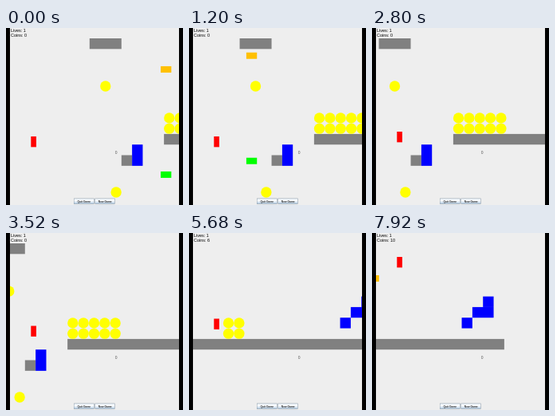
Animation of 222 by 222 pixels, one loop 8 s. Source, as an HTML page with a canvas:

```html
<!DOCTYPE html>
<html>
<head>
<meta charset="utf-8">
<style>
html, body { margin: 0; width: 100%; height: 100%; overflow: hidden; background: #000; }
canvas { display: block; width: 222px; height: 222px; }
</style>
</head>
<body>
<canvas id="stage"></canvas>
<script>
const LOOP = 8000, TICK = 80, U = 40 / 3, SCROLL = 2.75, ORIGIN = 104.8;
const LEFT = 5, RIGHT = 217, HERO_X = 31.3, HERO_W = U / 2;
const canvas = document.getElementById('stage');
const ctx = canvas.getContext('2d');
const ratio = window.devicePixelRatio || 1;
canvas.width = canvas.height = 222 * ratio;
ctx.scale(ratio, ratio);

// colour, grid column, top, columns, rows
const BLOCKS = [
  ['#808080', 0, 13, 3, 1],
  ['#808080', 3, 159.5, 1, 1],
  ['#00f', 4, 146.2, 1, 2],
  ['#808080', 7, 132.9, 18, 1],
  ['#00f', 21, 106.2, 1, 1],
  ['#00f', 22, 92.9, 2, 1],
  ['#00f', 23, 79.6, 1, 1]
];
// colour, middle height, first tick, last tick, x and wave phase at first tick
const FLYERS = [
  ['#ffc000', 53, 0, 21, 194, -0.2],
  ['#0f0', 185, 0, 21, 194, -0.2],
  ['#ffc000', 53, 71, 99, 223.4, -10.12],
  ['#0f0', 185, 71, 99, 218.9, -10.12]
];
const HERO_PATH = [[0, 136], [1760, 136], [2800, 130], [4000, 107.5], [6300, 107.5], [7800, 30], [8000, 30]];

function rect(color, x, y, w, h) {
  ctx.fillStyle = color;
  ctx.fillRect(x, y, w, h);
}

function text(str, x, y, size, color = '#000', weight = '') {
  ctx.font = `${weight} ${size}px "Liberation Sans", Arial, sans-serif`;
  ctx.fillStyle = color;
  ctx.fillText(str, x, y);
}

function coin(x, y) {
  ctx.fillStyle = '#ff0';
  ctx.beginPath();
  ctx.arc(x + U / 2, y, U / 2, 0, 2 * Math.PI);
  ctx.fill();
}

function button(label, x, w, pad) {
  const g = ctx.createLinearGradient(0, 214, 0, 220);
  g.addColorStop(0, '#e2ecf5');
  g.addColorStop(0.4, '#fff');
  g.addColorStop(1, '#b8cfe5');
  rect('#7a8a99', x, 213.7, w, 7);
  rect(g, x + 0.4, 214.1, w - 0.8, 6.2);
  text(label, x + pad, 218.5, 3.3, '#333', 'bold');
}

function heroTop(t) {
  const i = HERO_PATH.findIndex(p => p[0] > t);
  const [t0, y0] = HERO_PATH[i - 1], [t1, y1] = HERO_PATH[i];
  return y0 + (y1 - y0) * (t - t0) / (t1 - t0);
}

function draw(tick) {
  const colX = col => ORIGIN + col * U - tick * SCROLL;
  let score = 0;
  rect('#000', 0, 0, 222, 222);
  ctx.save();
  ctx.beginPath();
  ctx.rect(LEFT, 0, RIGHT - LEFT, 222);
  ctx.clip();
  rect('#eee', LEFT, 0, RIGHT - LEFT, 222);

  for (const [color, col, y, w, h] of BLOCKS) rect(color, colX(col), y, w * U, h * U);

  coin(colX(1), 73);
  coin(colX(2), 206);
  for (let k = 0; k < 5; k++) {
    const x = colX(7 + k);
    if (x <= HERO_X + HERO_W) {
      score += 2;
    } else {
      coin(x, 112.9);
      coin(x, 126.2);
    }
  }

  for (const [color, mid, first, last, x, phase] of FLYERS) {
    const n = tick - first;
    if (n < 0 || tick > last) continue;
    rect(color, x - n * 8.14, mid + 25.5 * Math.sin(phase + n * 0.3614), U, 8);
  }

  rect('#f00', HERO_X, heroTop(tick * TICK), HERO_W, U);
  text('0', 136.8, 157.6, 5, '#555');
  text('Lives: 1', 6, 5.2, 5.45);
  text('Coins: ' + score, 6, 11, 5.45);
  button('Quit Game', 85, 25.5, 4.5);
  button('New Game', 111.5, 25, 4.3);
  ctx.restore();
}

function frame() {
  draw(Math.floor(performance.now() % LOOP / TICK));
  requestAnimationFrame(frame);
}
frame();
</script>
</body>
</html>
```
